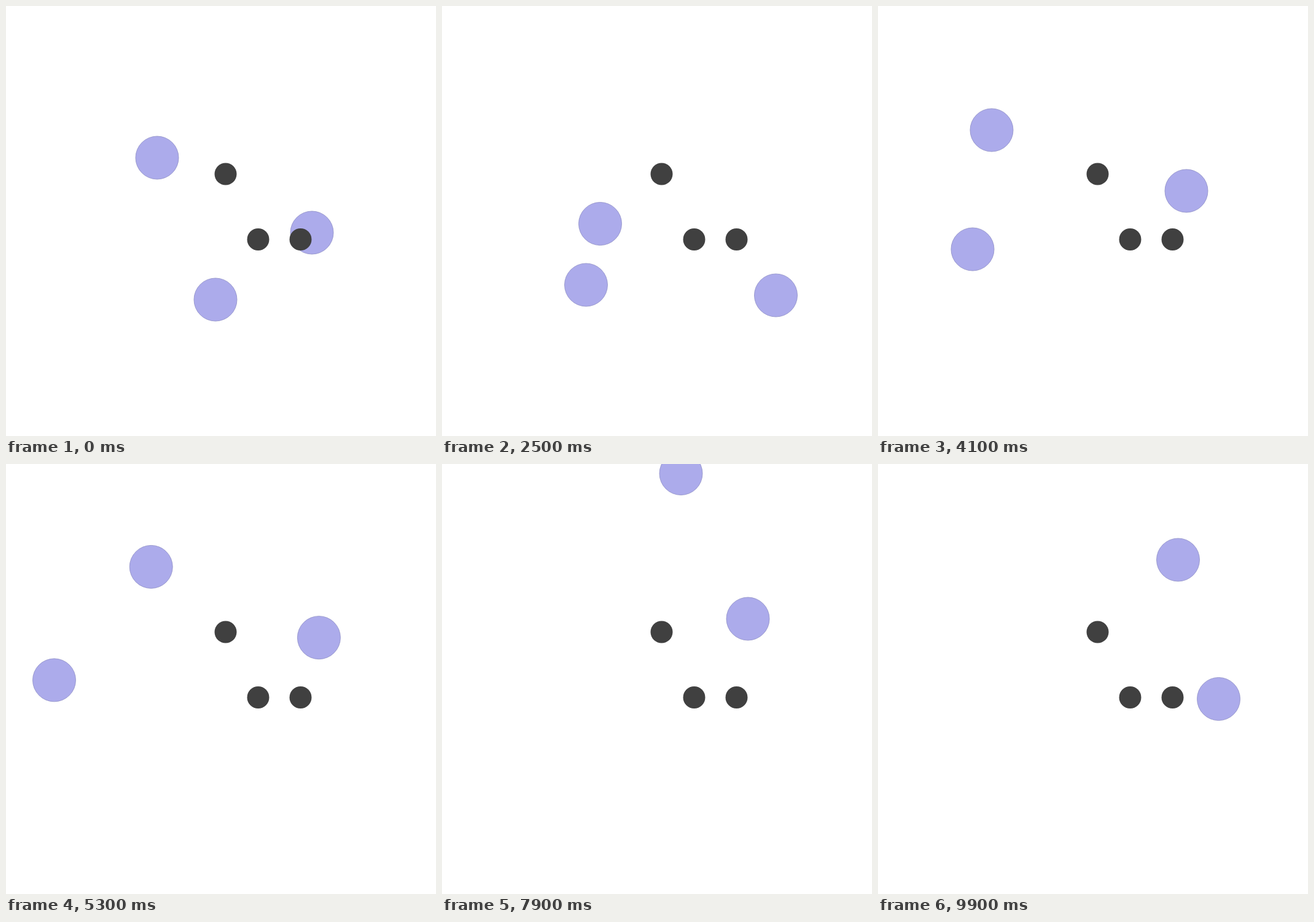
An HTML page that plays this animation: 700 by 700 pixels, repeating every 10000 ms.

```html
<!DOCTYPE html>
<html lang="en">
<head>
<meta charset="utf-8">
<title>Agents and landmarks</title>
<style>
  html, body { margin: 0; width: 100%; height: 100%; overflow: hidden; background: #fff; }
  svg { display: block; width: 100%; height: 100%; }
  .agent { fill: #acabeb; stroke: #8f8fc6; stroke-width: .8; }
  .landmark { fill: #404040; }
</style>
</head>
<body>
<svg id="stage" viewBox="0 0 700 700"></svg>
<script>
const STEP = 100, STEPS = 100;
const stage = document.getElementById('stage');

// Waypoints: [step, x, y]
const paths = [
  [[0, 246, 247], [5, 250, 239], [13, 259, 264], [25, 257.5, 354.5], [33, 221, 251],
   [41, 185, 202], [44, 188, 188], [55, 250, 161], [65, 330.5, 82], [66, 336, 62],
   [72, 350, -5], [79, 389, 15.5], [88, 431, 40], [99, 488.5, 156]],
  [[0, 341, 478], [13, 241, 398], [18, 218, 410], [25, 234.5, 454], [29, 230, 495],
   [33, 205, 470], [41, 154, 396], [44, 114, 383], [55, 69, 350], [65, -17, 358],
   [70, -60, 365]],
  [[0, 498, 369], [10, 607, 435], [13, 604.5, 451], [22, 557, 467], [25, 543.5, 471],
   [33, 529, 400], [41, 502, 301], [49, 531, 280], [55, 494, 285], [65, 424, 306],
   [70, 440, 371], [77, 486, 280], [79, 498, 252], [88, 549, 310], [94, 564, 352],
   [99, 554.5, 382.5]]
];
const landmarks = [[357.5, 273.5], [410.5, 380], [479.5, 380]];

function addCircle(className, r, x, y) {
  const circle = document.createElementNS('http://www.w3.org/2000/svg', 'circle');
  circle.setAttribute('class', className);
  circle.setAttribute('r', r);
  place(circle, x, y);
  return stage.appendChild(circle);
}

function place(circle, x, y) {
  circle.setAttribute('cx', x);
  circle.setAttribute('cy', y);
}

function slope(a, b, axis) {
  return (b[axis] - a[axis]) / (b[0] - a[0]);
}

// Harmonic mean of the neighbouring slopes, flat at turning points
function tangent(path, i, axis) {
  if (i === 0 || i === path.length - 1) return 0;
  const before = slope(path[i - 1], path[i], axis);
  const after = slope(path[i], path[i + 1], axis);
  return before * after > 0 ? 2 * before * after / (before + after) : 0;
}

function sample(path, step, axis) {
  const next = path.findIndex(point => point[0] > step);
  if (next < 0) return path[path.length - 1][axis];
  const a = path[next - 1], b = path[next];
  const span = b[0] - a[0], u = (step - a[0]) / span, v = 1 - u;
  return v * v * (1 + 2 * u) * a[axis] + u * u * (1 + 2 * v) * b[axis]
    + span * u * v * (v * tangent(path, next - 1, axis) - u * tangent(path, next, axis));
}

const agents = paths.map(([[, x, y]]) => addCircle('agent', 35, x, y));
landmarks.forEach(([x, y]) => addCircle('landmark', 18, x, y));

function render(time) {
  const step = Math.floor(time / STEP) % STEPS;
  agents.forEach((agent, i) => place(agent, sample(paths[i], step, 1), sample(paths[i], step, 2)));
}

const start = performance.now();
function tick() {
  render(performance.now() - start);
  requestAnimationFrame(tick);
}
tick();
</script>
</body>
</html>
```
